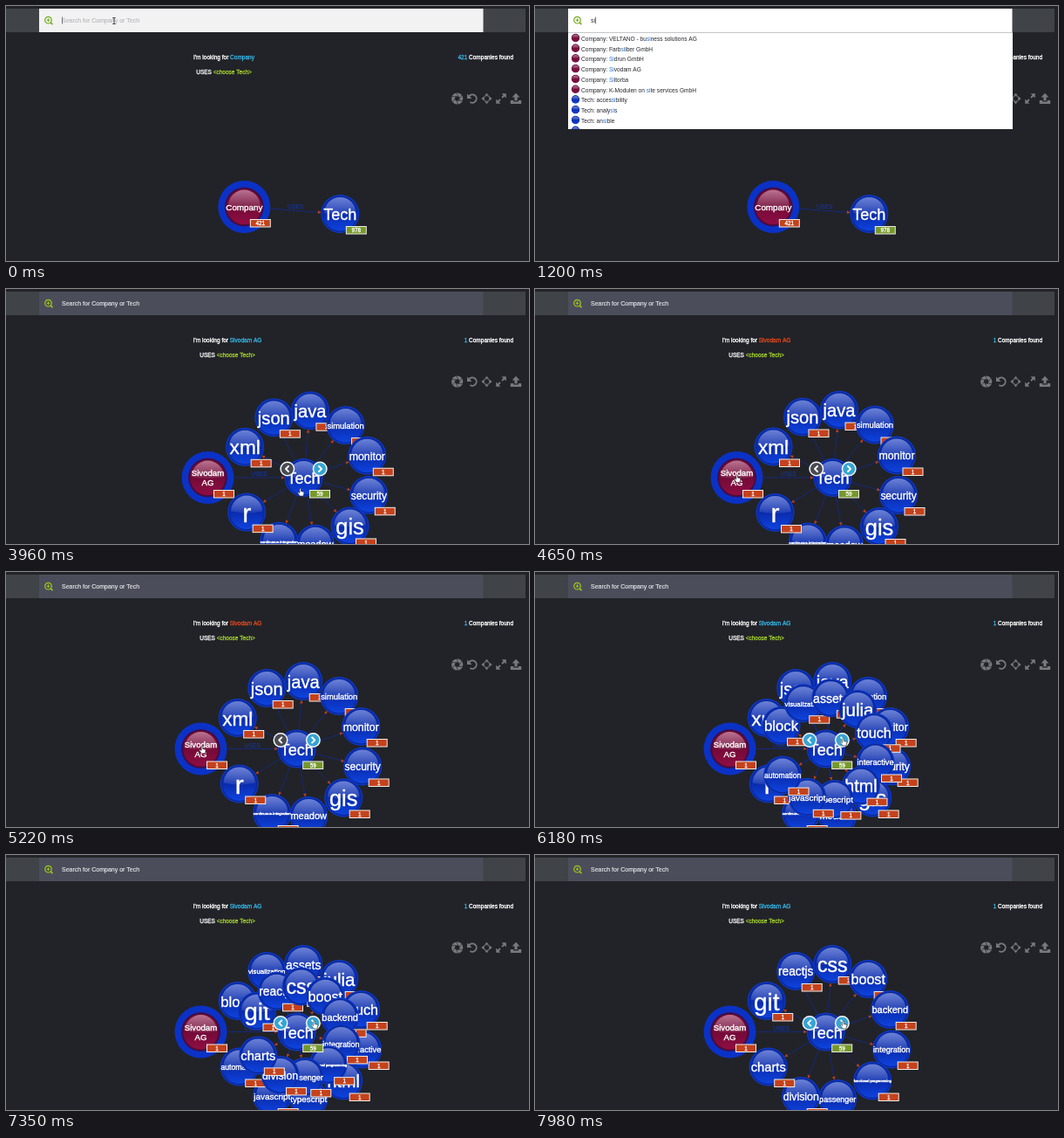
These frames come from a looping animation (600 px wide and 292 px high, 8 s). An HTML page with a canvas:

```html
<!DOCTYPE html>
<html lang="en">
<head>
<meta charset="utf-8">
<title>Company and tech graph search</title>
<style>
  html, body { margin: 0; width: 100%; height: 100%; overflow: hidden; background: #222328; }
  canvas { display: block; width: 600px; height: 292px; }
</style>
</head>
<body>
<canvas id="stage"></canvas>
<script>
const LOOP = 8000, TAU = Math.PI * 2;
const FONT = '"Liberation Sans", Arial, sans-serif';
const BLUE = '#0b32c6', RED = '#e0481c', CYAN = '#35b4e4', LIME = '#a2cf2e', WHITE = '#fff';
const NAME = 'Sivodam AG';

const canvas = document.getElementById('stage');
const ctx = canvas.getContext('2d');
const ratio = window.devicePixelRatio || 1;
canvas.width = 600 * ratio;
canvas.height = 292 * ratio;

const RESULTS = [
  'Company: VELTANO - business solutions AG', 'Company: Farbsilber GmbH', 'Company: Sidrun GmbH',
  'Company: ' + NAME, 'Company: Siltorba', 'Company: K-Modulen on site services GmbH',
  'Tech: accessibility', 'Tech: analysis', 'Tech: ansible', 'Tech: assistant'
];

const PAGES = [
  { start: 3600, names: ['xml', 'json', 'java', 'simulation', 'monitor', 'security', 'gis', 'meadow', 'continuous-integration', 'r'] },
  { start: 5980, names: ['block', 'visualization', 'assets', 'julia', 'touch', 'interactive', 'html', 'typescript', 'javascript', 'automation'] },
  { start: 7180, names: ['git', 'reactjs', 'css', 'boost', 'backend', 'integration', 'functional programming', 'passenger', 'division', 'charts'] }
];
const SPREAD = 400;
const SLOTS = [[-68, -35.5], [-34.5, -69.5], [7.5, -77.5], [48.5, -60.5], [73.5, -25.5],
               [75.5, 20], [53.5, 56], [13.5, 76.5], [-28.5, 73.5], [-66, 40]];

// Time, x, y
const POINTER = [[0, 124, 17], [1750, 124, 17], [2200, 92, 37], [2500, 92, 37], [2950, 297, 216], [3200, 297, 216],
                 [3420, 361, 236], [3800, 361, 236], [4400, 232, 217], [4700, 232, 217], [4950, 224.5, 203.5],
                 [5200, 224.5, 203.5], [5650, 354, 194.5], [8000, 354, 194.5]];
const COMPANY_PATH = [[0, 273.3, 230], [2480, 273.3, 230], [2880, 231.5, 216], [4700, 231.5, 216], [4950, 223.5, 202.5], [8000, 223.5, 202.5]];
const TECH_PATH = [[0, 383.3, 238], [2480, 383.3, 238], [2880, 341.5, 216], [4700, 341.5, 216], [4950, 333.7, 202.5], [8000, 333.7, 202.5]];

const clamp = v => Math.max(0, Math.min(1, v));
const progress = (t, start, length) => clamp((t - start) / length);
const easeOut = p => 1 - (1 - p) * (1 - p);
const easeInOut = p => p * p * (3 - 2 * p);
const between = (t, a, b) => t >= a && t < b;

function along(path, t) {
  const i = Math.max(1, path.findIndex(k => k[0] > t));
  const [t0, x0, y0] = path[i - 1], [t1, x1, y1] = path[i];
  const p = easeInOut((t - t0) / (t1 - t0));
  return [x0 + (x1 - x0) * p, y0 + (y1 - y0) * p];
}

function setFont(size) {
  ctx.font = `${size}px ${FONT}`;
}

// A hairline outline gives the slightly heavy weight of light text on dark.
function text(str, x, y, size, color, align = 'left', outline = 0.3) {
  setFont(size);
  ctx.textAlign = align;
  ctx.fillStyle = ctx.strokeStyle = color;
  ctx.fillText(str, x, y + size * 0.36);
  if (!outline) return;
  ctx.lineWidth = outline;
  ctx.lineJoin = 'round';
  ctx.strokeText(str, x, y + size * 0.36);
}

// Draws [string, color] parts in a row.
function parts(list, x, y, size, outline) {
  for (const [str, color] of list) {
    text(str, x, y, size, color, 'left', outline);
    x += ctx.measureText(str).width;
  }
}

function widthOf(list, size) {
  setFont(size);
  return list.reduce((sum, [str]) => sum + ctx.measureText(str).width, 0);
}

function rect(x, y, w, h, color) {
  ctx.fillStyle = color;
  ctx.fillRect(x, y, w, h);
}

function disc(x, y, r, color) {
  ctx.fillStyle = color;
  ctx.beginPath();
  ctx.arc(x, y, r, 0, TAU);
  ctx.fill();
}

function stroke(d, color, width) {
  ctx.strokeStyle = color;
  ctx.lineWidth = width;
  ctx.stroke(new Path2D(d));
}

function fill(d, color) {
  ctx.fillStyle = color;
  ctx.fill(new Path2D(d));
}

function at(x, y, draw) {
  ctx.save();
  ctx.translate(x, y);
  draw();
  ctx.restore();
}

function ball(x, y, r, [rim, edge, base, glow, shine]) {
  at(x, y, () => {
    ctx.scale(r / 22, r / 22);
    disc(0, 0, 22, rim);
    disc(0, 0, 20.6, edge);
    const body = ctx.createLinearGradient(0, -19, 0, 20);
    body.addColorStop(0, base);
    body.addColorStop(0.5, base);
    body.addColorStop(1, glow);
    disc(0, 0, 19.6, body);
    const gloss = ctx.createLinearGradient(0, -19, 0, 1);
    gloss.addColorStop(0, shine);
    gloss.addColorStop(1, 'rgba(255,255,255,.07)');
    fill('M-18 -1A18 18 0 0 1 18 -1Q0 3 -18 -1z', gloss);
  });
}
const blueBall = (x, y, r) => ball(x, y, r, ['#0c38c6', '#0a2590', '#0a2cae', '#0e44e0', 'rgba(200,212,255,.5)']);
const wineBall = (x, y, r) => ball(x, y, r, ['#3a1058', '#5a0a30', '#740a38', '#900e44', 'rgba(255,215,230,.5)']);

function badge(x, y, label, color) {
  rect(x + 6.5, y + 14, 24, 9.5, '#f0eeea');
  rect(x + 7.5, y + 15, 22, 7.5, color);
  text(label, x + 18.5, y + 18.8, 6.3, WHITE, 'center');
}

function fitted(label, x, y) {
  setFont(10);
  const w = ctx.measureText(label).width / 10;
  text(label, x, y, Math.min(30, 43.5 / Math.sqrt(w * w + 1.3)), WHITE, 'center', 0.4);
}

function techNode(x, y, label, count, color) {
  blueBall(x, y, 22);
  fitted(label, x, y + 0.5);
  badge(x, y, count, color);
}

function companyNode(x, y, picked) {
  disc(x, y, 30, BLUE);
  wineBall(x, y, 22.5);
  if (picked) {
    NAME.split(' ').forEach((line, i) => text(line, x, y - 5.3 + i * 11, 9.6, WHITE, 'center', 0.4));
  } else {
    fitted('Company', x, y);
  }
  badge(x, y, picked ? '1' : '421', '#c4421c');
}

function edge(x0, y0, x1, y1, gap0, gap1, color, width, head) {
  const angle = Math.atan2(y1 - y0, x1 - x0), length = Math.hypot(x1 - x0, y1 - y0) - gap1;
  if (length <= gap0) return;
  at(x0, y0, () => {
    ctx.rotate(angle);
    stroke(`M${gap0} 0H${length - 1}`, color, width);
    fill(`M${length} 0l${-head} ${-head * 0.45}v${head * 0.9}z`, color === RED ? RED : '#b8401f');
  });
}

function pageButton(x, y, dir, color) {
  disc(x, y, 8.5, '#f4f6f8');
  disc(x, y, 7, color);
  at(x, y, () => stroke(`M${-1.8 * dir} -3.6L${1.8 * dir} 0L${-1.8 * dir} 3.6`, WHITE, 1.9));
}

function graph(t) {
  const [cx, cy] = along(COMPANY_PATH, t), [tx, ty] = along(TECH_PATH, t);
  const picked = t >= 2460, hot = between(t, 2930, 3270);
  const mx = (cx + tx) / 2 + 4, my = (cy + ty) / 2;

  edge(cx, cy, tx, ty, 31, 21.5, hot ? RED : '#122a86', hot ? 1.4 : 0.9, hot ? 8 : 4);
  text('USES', mx, my - 4, 6.8, hot ? RED : '#1238b4', 'center', 0);
  if (hot) at(mx, my + 0.5, () => stroke('M-4 -4L4 4M4 -4L-4 4', RED, 2.2));

  const live = PAGES.filter((page, i) => {
    const next = PAGES[i + 1];
    return t >= page.start && (!next || t < next.start + SPREAD);
  });
  for (const page of live) page.spread = easeOut(progress(t, page.start, SPREAD));
  const eachChild = draw => live.forEach(({ names, spread }) =>
    names.forEach((name, i) => draw(name, tx + SLOTS[i][0] * spread, ty + SLOTS[i][1] * spread)));

  eachChild((name, x, y) => edge(tx, ty, x, y, 22, 21.5, '#122a86', 0.8, 4));
  companyNode(cx, cy, picked);
  eachChild((name, x, y) => techNode(x, y, name, '1', '#c4421c'));
  techNode(tx, ty, 'Tech', picked ? '59' : '978', '#76992c');
  if (live.length) {
    pageButton(tx - 18.7, ty - 10, -1, t < PAGES[1].start ? '#4a4b52' : '#36a5d4');
    pageButton(tx + 18.7, ty - 10, 1, '#36a5d4');
  }
}

function heading(t) {
  const picked = t >= 2460;
  const nameColor = between(t, 4330, 5260) ? RED : CYAN;
  const usesColor = between(t, 2930, 3270) ? RED : WHITE;
  const lines = [
    [["I'm looking for ", WHITE], [picked ? NAME : 'Company', picked ? nameColor : CYAN]],
    [['USES ', usesColor], ['<choose Tech>', LIME]]
  ];
  lines.forEach((line, i) => parts(line, (picked ? 254 : 250) - widthOf(line, 6.5) / 2, 59 + i * 16.2, 6.5));
  const found = [[picked ? '1' : '421', CYAN], [' Companies found', WHITE]];
  parts(found, 582 - widthOf(found, 6.5), 59, 6.5);
}

function toolbar() {
  const gray = '#77797c', dark = '#222328';
  at(517.7, 106, () => {
    disc(0, 0, 6.6, gray);
    disc(0, 0, 2.7, dark);
    for (let i = 0; i < 6; i++) {
      ctx.rotate(TAU / 6);
      stroke('M2.7 0L5.2 -4.4', dark, 0.6);
    }
  });
  at(535, 106, () => {
    stroke('M-3.8 -2.6A4.7 4.7 0 1 1 -2.6 4', gray, 1.9);
    fill('M-6 -5.5V0H-.4z', gray);
  });
  at(551.5, 106, () => {
    stroke('M-3.4 0A3.4 3.4 0 1 1 3.4 0A3.4 3.4 0 1 1 -3.4 0', gray, 1);
    for (let i = 0; i < 4; i++) {
      ctx.rotate(TAU / 4);
      fill('M6.2 0L3.4 -2.3V2.3z', gray);
    }
  });
  at(568, 106, () => {
    stroke('M-4 4L-1 1M1 -1L4 -4', gray, 1.8);
    fill('M5.8 -5.8V-.6L.6 -5.8zM-5.8 5.8V.6L-.6 5.8z', gray);
  });
  at(585, 106, () =>
    fill('M0 -6.3L4.4 -1.6H1.6V2.2H-1.6V-1.6H-4.4zM-6.2 2H-2.8V3.6H2.8V2H6.2V6H-6.2z', gray));
}

function resultRow(label, query, y) {
  (label.startsWith('Company') ? wineBall : blueBall)(46.5, y - 1, 4.6);
  const [kind, name] = label.split(': ');
  const pieces = name.split(new RegExp(`(${query})`, 'i'))
    .map(piece => [piece, piece.toLowerCase() === query ? '#2478dc' : '#26272c']);
  parts([[kind + ': ', '#26272c'], ...pieces], 53, y, 6.6, 0);
}

function search(t) {
  rect(0, 3, 596, 27, '#404347');
  const focus = t < 2460 ? 0.93 + 0.07 * progress(t, 0, 200) : 1 - progress(t, 2460, 300);
  rect(38, 3, 509.5, 27, '#4b4e5a');
  ctx.globalAlpha = focus;
  rect(38, 3, 509.5, 27, WHITE);
  ctx.globalAlpha = 1;

  const green = focus > 0.5 ? '#78ac22' : '#9cc51a';
  at(48.5, 16.2, () => {
    stroke('M-3.8 0A3.8 3.8 0 1 1 3.8 0A3.8 3.8 0 1 1 -3.8 0', green, 1.2);
    stroke('M2.7 2.7L5 5', green, 1.6);
    stroke('M-1.9 0H1.9M0 -1.9V1.9', green, 1.1);
  });

  const query = t < 600 || t >= 2460 ? '' : t < 850 ? 's' : t < 1750 ? 'si' : 'siv';
  if (query) text(query, 64, 16.5, 7, '#26272c', 'left', 0);
  else text('Search for Company or Tech', 64, 16.5, 7, focus > 0.5 ? '#b9b9bd' : '#e8e9ec', 'left', 0.15);
  if (t < 2460) {
    setFont(7);
    rect(64.3 + ctx.measureText(query).width, 12.5, 0.7, 8, '#44464c');
  }
  if (!query || t < 760) return;

  const rows = RESULTS.filter(label => label.split(': ')[1].toLowerCase().includes(query));
  const height = Math.min(111, rows.length * 11.75 + 2);
  ctx.save();
  ctx.beginPath();
  ctx.rect(38, 30, 510, height);
  ctx.clip();
  rect(38, 30, 510, height, WHITE);
  rect(38, 30, 510, 0.7, '#aaacb0');
  rows.forEach((label, i) => resultRow(label, query, 37.4 + i * 11.75));
  ctx.restore();
}

function pointer(t) {
  if (between(t, 600, 1750)) return;
  const [x, y] = along(POINTER, t);
  at(x, y, () => {
    if (t < 1900) {
      stroke('M-1.7 -3.5H1.7M0 -3.5V3.5M-1.7 3.5H1.7', '#33353a', 0.9);
      return;
    }
    const hand = 'M-1.2 -4Q-.3 -5 .4 -4V-1L3.2 -.3Q4 0 3.8 1L3 4.4H-1L-3.4 1Q-3.4 -.3 -2.2 .2L-1.2 1z';
    fill(hand, WHITE);
    stroke(hand, '#222', 0.6);
  });
}

function frame(now) {
  const t = now % LOOP;
  ctx.setTransform(ratio, 0, 0, ratio, 0, 0);
  rect(0, 0, 600, 292, '#222328');
  heading(t);
  toolbar();
  graph(t);
  search(t);
  pointer(t);
  requestAnimationFrame(frame);
}
requestAnimationFrame(frame);
</script>
</body>
</html>
```
